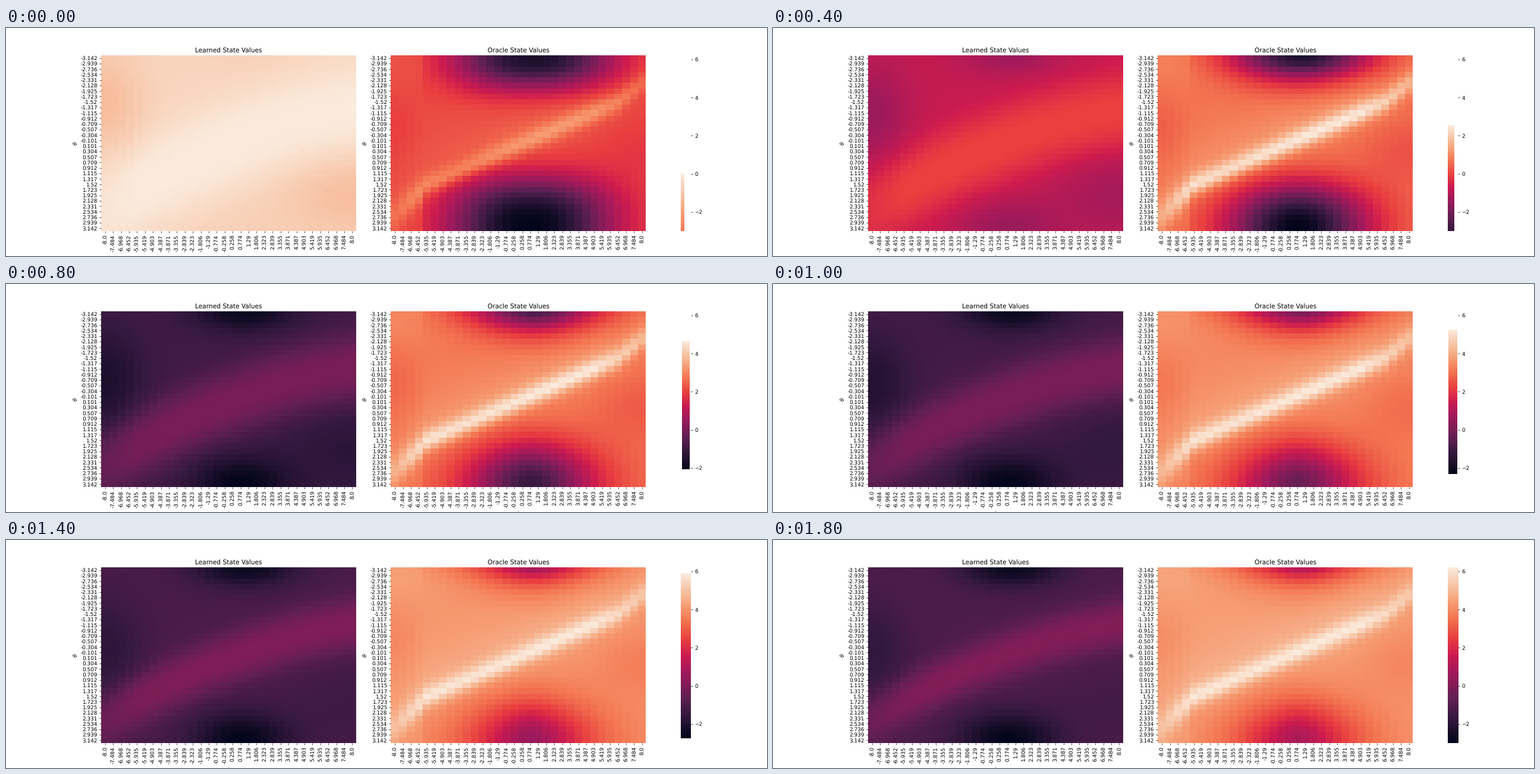
Animation of 1280 by 384 pixels, one loop 2000 ms. Source, as a matplotlib script:

```python
import numpy as np
import matplotlib.pyplot as plt
from matplotlib.animation import FuncAnimation
from matplotlib.colors import LinearSegmentedColormap

N = 32
FRAMES = 10
BAR_LIM = (-2.99, 6.21)

CMAP = LinearSegmentedColormap.from_list("ember", [
    (0, "#03051A"), (1 / 7, "#35193E"), (0.25, "#611F53"), (0.4, "#A11A5B"),
    (0.5, "#CB1B4F"), (0.6, "#E83F3F"), (5 / 7, "#F37651"), (0.8, "#F69C73"),
    (6 / 7, "#F6B48F"), (1, "#FAEBDD")], N=512)

row, col = np.mgrid[0:N, 0:N].astype(float)


def blob(cx, cy, sx, sy, px=2, py=2):
    return np.exp(-np.abs((col - cx) / sx) ** px - np.abs((row - cy) / sy) ** py)


def oracle(k):
    """Values climb towards a limit while the two pits shrink."""
    q = np.exp(-k / 2.6)
    top = 6.5 - 8.5 * q
    height = 1.95

    # Ridge: steep on the lower side, with a long shoulder above
    d = row - np.interp(col, [0, 4, 28, 31], [28.5, 23.1, 8, 4.5])
    strength = np.interp(col, [0, 4, 25, 31], [0.5, 1, 1, 0.6])
    wide = np.interp(col, [0, 4, 31], [3, 1.9, 1.9])
    peak = np.exp(-(d / wide) ** 2)
    above = 0.55 * peak + 0.45 * np.exp(-np.abs(d) / 6)
    below = 0.78 * peak + 0.22 * np.exp(-np.abs(d) / 4)
    value = top - height + height * strength * np.where(d < 0, above, below)

    value += 0.25 * blob(0, 1, 8, 5) - 0.25 * blob(0, 13, 3, 6)
    value -= 0.4 * blob(31, 17, 6, 6)

    depth = 3.4 + 3 * q ** 1.3
    sx, px = 7.6 + 2.4 * q, 1.6 + 0.7 * q
    pits = blob(17, 31, sx, 7.2 + 1.9 * q, px, 1.8 + 0.9 * q)
    pits += 0.9 * blob(17.5, 0, sx, 2.8 + 2.9 * q, px, 1.1 + q)
    return value - depth * pits * np.where(col < 4, 0.35, 1)


def learned(k):
    """A band stays near zero while everything around it sinks."""
    p = 1 - (1 - k / (FRAMES - 1)) ** 1.5
    base = -0.6 - 0.55 * p
    crest = 27 - 0.845 * col + 0.00945 * col ** 2
    d = np.abs(row - crest) / (8.7 - 4.2 * p)
    value = base * (1 - np.interp(col, [0, 4], [0.7, 1]) * np.exp(-d ** 2.5))
    value -= 0.65 * blob(0, 8 + 7 * p, 4.5, 9)
    value -= (0.6 - 0.4 * p) * blob(31, 25, 9, 8)
    pits = blob(17, 31, 6, 5) + 0.9 * blob(17.5, 0, 6.2, 3, 2, 1.6)
    return value - (0.1 + 1.74 * p) * pits


def heatmap(ax, title):
    mesh = ax.pcolormesh(np.zeros((N, N)), cmap=CMAP)
    centres = np.arange(N) + 0.5
    speeds = [str(round(v, 3)) for v in np.linspace(-8, 8, N).tolist()]
    angles = [str(round(v, 3)) for v in np.linspace(-np.pi, np.pi, N).tolist()]
    ax.set(xlim=(0, N), ylim=(N, 0), title=title,
           xlabel=r"$\dot{\theta}$", ylabel=r"$\theta$")
    ax.set_xticks(centres, speeds, rotation=90)
    ax.set_yticks(centres, angles)
    ax.spines[:].set_visible(False)
    return mesh


plt.rcParams.update({"font.family": "DejaVu Sans", "text.hinting": "none"})
fig, (ax_learned, ax_oracle, ax_bar) = plt.subplots(
    1, 3, figsize=(20, 6), dpi=64, gridspec_kw={"width_ratios": [1, 1, 0.04]})

learned_mesh = heatmap(ax_learned, "Learned State Values")
oracle_mesh = heatmap(ax_oracle, "Oracle State Values")

bar = ax_bar.imshow(np.linspace(0, 1, 256)[:, None], cmap=CMAP,
                    origin="lower", aspect="auto", interpolation="nearest")
ax_bar.set(xticks=[], yticks=[-2, 0, 2, 4, 6])
ax_bar.yaxis.tick_right()
ax_bar.spines[:].set_visible(False)


def draw(k):
    fields = learned(k), oracle(k)
    low, high = np.min(fields), np.max(fields)
    for mesh, field in zip((learned_mesh, oracle_mesh), fields):
        mesh.set_array(field)
        mesh.set_clim(low, high)
    # The scale is a square in value space, clipped to the fixed axis
    bar.set_extent((low, high, low, high))
    ax_bar.set(xlim=BAR_LIM, ylim=BAR_LIM)
    return learned_mesh, oracle_mesh, bar


anim = FuncAnimation(fig, draw, frames=FRAMES, interval=200,
                     init_func=lambda: draw(0), repeat=True)
plt.show()
```
